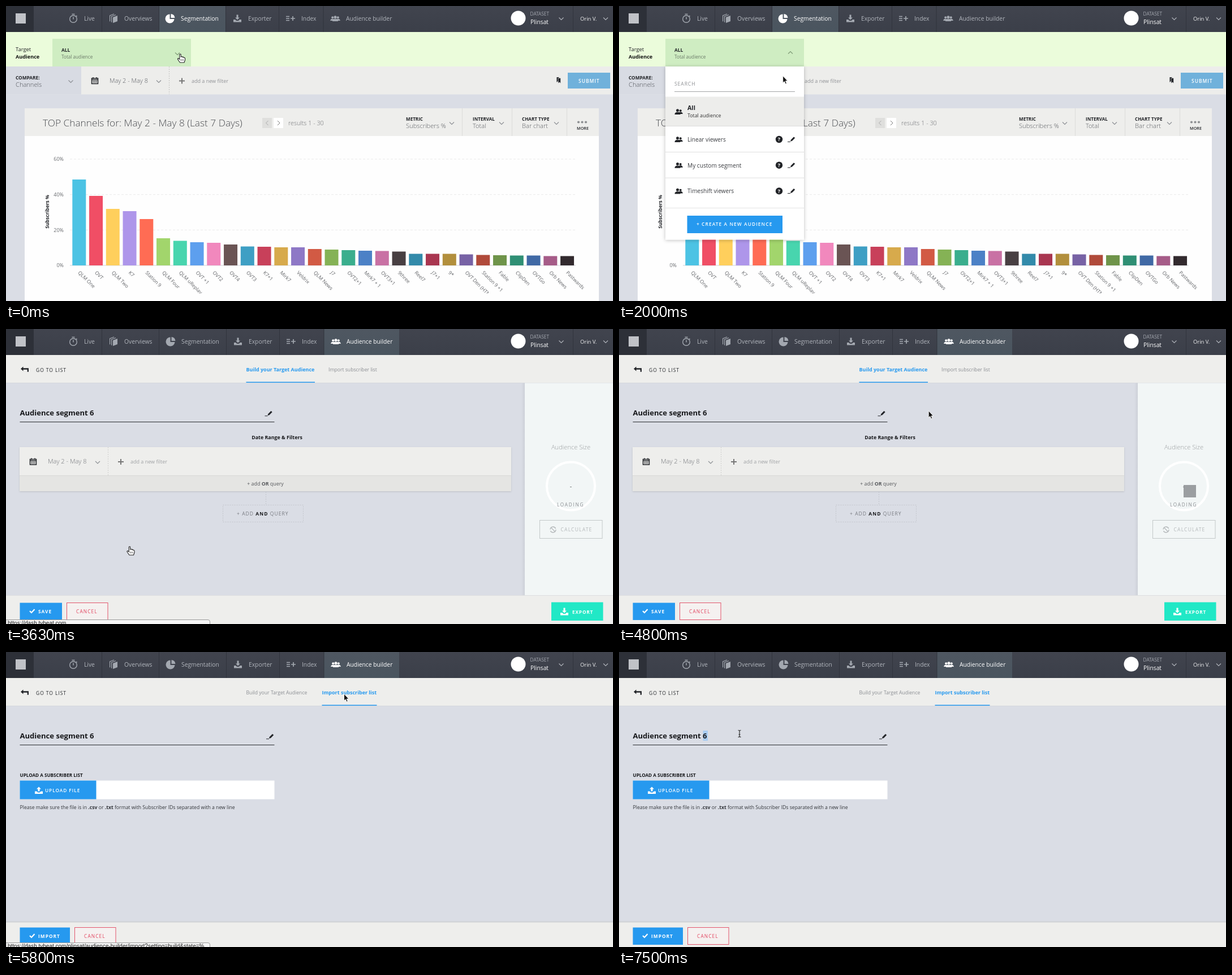
These frames come from a looping animation (1073 px wide and 522 px high, 8 s). An HTML page:

```html
<!DOCTYPE html>
<html lang="en">
<head>
<meta charset="utf-8">
<title>Audience builder</title>
<style>
html, body { margin: 0; width: 100%; height: 100%; overflow: hidden; background: #dadde5; }
svg { display: block; width: 100vw; height: 100vh; font-family: "Open Sans", sans-serif; }
</style>
</head>
<body>
<svg id="stage" viewBox="0 0 1073 522"></svg>
<script>
const LOOP = 8000;
const BLUE = '#2699ef', DARK = '#222428', GREY = '#8b8e93', PALE = '#eeeeec', BACK = '#dadde5';

// Drawing helpers
const rect = (x, y, w, h, fill, more = '') =>
  `<rect x="${x}" y="${y}" width="${w}" height="${h}" fill="${fill}" ${more}/>`;
const line = (x1, y1, x2, y2, stroke, more = '') =>
  `<path d="M${x1} ${y1}L${x2} ${y2}" stroke="${stroke}" fill="none" ${more}/>`;
const path = (d, fill, more = '') => `<path d="${d}" fill="${fill}" ${more}/>`;
const stroke = (d, color, width = 1, more = '') =>
  `<path d="${d}" fill="none" stroke="${color}" stroke-width="${width}" ${more}/>`;
const circle = (x, y, r, fill, more = '') => `<circle cx="${x}" cy="${y}" r="${r}" fill="${fill}" ${more}/>`;
const text = (x, y, str, size, fill, weight = 400, gap = 0, more = '') =>
  `<text x="${x}" y="${y}" font-size="${size}" fill="${fill}" font-weight="${weight}" letter-spacing="${gap}" ${more}>${str}</text>`;
const at = (x, y, body, scale = 1) => `<g transform="translate(${x} ${y}) scale(${scale})">${body}</g>`;
const group = (id, body) => `<g id="${id}">${body}</g>`;
const DASH = 'stroke-dasharray="2 2"';
const MIDDLE = 'text-anchor="middle"';

// Icons, centred on x, y
const chevron = (x, y, c, up) => at(x, y, stroke(up ? 'M-4 2L0-2L4 2' : 'M-4-2L0 2L4-2', c, 1.1));
const plus = (x, y) => at(x, y, stroke('M-5 0H5M0-5V5', '#777', 2));
const pencil = (x, y) => at(x, y,
  path('M-2 3.5L-1.2 .8L4-4.5L6.2-2.4L1 2.8Z', DARK) + stroke('M-7 4.3h5', DARK));
const calendar = (x, y) => at(x, y,
  stroke('M-5.5-4h11v9.5h-11zM-5.5-1.5h11M-3-6v3M3-6v3', DARK, 1.5) +
  stroke('M-3.5 1h7M-3.5 3.2h7', DARK, 1.3, 'stroke-dasharray="1.6 1.1"'));
const person = (x, scale, c) => at(x, 0,
  circle(0, -2.2, 2.5, c) + path('M-5 5c0-3 2-3.7 3.5-4.2h3c1.5.5 3.5 1.2 3.5 4.2z', c), scale);
const pair = (x, y) => at(x, y, person(3.2, .8, DARK) + person(-2, 1, DARK));
const trio = c => person(-4.8, .8, c) + person(4.8, .8, c) + person(0, 1, c);
const check = (x, y) => at(x, y, stroke('M-4 0l3 3l5.5-6', '#fff', 2.2));
const tray = (c, up) => path('M-7 2v4.5h14v-4.5h-3.5l-1.5 2h-4l-1.5-2z', c) +
  path(up ? 'M0-6l4 4h-2.5v4h-3v-4h-2.5z' : 'M0 2.5l4-4h-2.5v-5h-3v5h-2.5z', c);
const stopwatch = c => circle(0, 1, 6.3, 'none', `stroke="${c}" stroke-width="1.4"`) +
  stroke('M0 1.5v-4M-2.5-7.5h5M5-5l1.5 1.5', c, 1.5);
const layers = c => path('M-1-2L7-5V5L-1 8ZM-4-4L4-7V-5.8L-2.8-3.2V6.5L-4 7ZM-7-5.5L1-8.5V-7.3L-5.8-4.7V5L-7 5.5Z', c);
const pie = c => path('M-1-7.5A8 8 0 1 0 7 1H-1z', c) + path('M1-8A8 8 0 0 1 8-1H1z', c);
const list = c => stroke('M-8-3.5h6M-8 0h6M-8 3.5h6M0 0h8M4-4v8', c, 1.7);

// The items right of the active tab sit dx further along
function header(active, dx) {
  const items = [
    [119, 138, 'Live', stopwatch, 169, 0], [190, 209, 'Overviews', layers, 270, 0],
    [290.5, 309, 'Segmentation', pie, 388, 1], [409, 428, 'Exporter', tray, 482, 1],
    [503, 522, 'Index', list, 560.5, 1], [582, 601, 'Audience builder', trio, 0, 1]];
  const [left, width] = active === 2 ? [270, 118] : [562, 133];
  const edgeLine = x => line(x + .5, 0, x + .5, 46, '#31343d');
  let out = rect(0, 0, 1073, 46, 'url(#bar)') + rect(0, 0, 49, 46, '#2d3038') + rect(17, 13, 18, 18, '#c0c2c7') +
    rect(left, 0, width, 46, 'url(#tab)');
  items.forEach(([iconX, textX, label, icon, edge, moves], i) => {
    const d = moves * dx, on = i === active;
    out += at(iconX + d, 22, icon(on ? '#fff' : '#a3a8b0')) + text(textX + d, 25.5, label, 10.3, on ? '#fff' : '#b1b5bc');
    if (edge) out += edgeLine(edge + d);
  });
  return out + circle(905.5, 21.5, 13, '#fff') + text(926.5, 17, 'DATASET', 8.3, '#a5a9b1') +
    text(927, 32, 'Plinsat', 10.3, '#fff') + chevron(981.5, 22.5, '#b1b5bc') + edgeLine(1002) +
    text(1015, 25.5, 'Orin V.', 9.4, '#f3f3f4') + chevron(1060, 22.5, '#b1b5bc');
}

const COLORS = ('4cc3e4 f04e65 ffcf5c ae96ea ff6c54 a2d56c 48d5ae 5d9fee f188bd 6a5454 3e9fc4 c8405a d7aa4c 8e78c6 d25a44 ' +
  '85b255 3aae8d 4c81c6 c971a4 483f42 328aaa a93650 b28f3c 7762a5 b04a3a 6f944a 2f8f74 4069a5 a65c88 322a2e').split(' ');
const CHANNELS = ('QLM One,OVT,QLM Two,K7,Station 9,QLM Four,QLM uReplay,OVT +1,OVT2,OVT4,OVT3,K7+1,Mirk7,Veldrix,QLM News,' +
  'J7,OVT2+1,Mirk7 + 1,OVT3+1,9three,Reel7,J7+1,9*,OVT Den (HTML5),Station 9 +1,Fable,ClipDen,OVTGo,Orb News,Pastwards').split(',');
const HEIGHTS = [152, 123, 100, 96, 82, 48, 43.5, 41, 40, 37, 33.5, 33, 32, 32, 29, 28, 27, 26, 25.5, 24.5,
  20.5, 20.5, 20.5, 19.5, 18.5, 18, 17.5, 17.5, 16.5, 16.5];

function chart() {
  let out = rect(33, 181, 1015, 341, '#fefefe') + rect(33, 181, 1015, 49, PALE) +
    text(65, 213, 'TOP Channels for: May 2 - May 8 (Last 7 Days)', 17.3, '#4a4c50', 300) +
    rect(453, 198, 17, 18, '#dfdfdd') + rect(473, 198, 17, 18, '#fff') +
    stroke('M463.5 203l-4 4l4 4', '#aaa') + stroke('M480 203l4 4l-4 4', '#777') +
    text(499, 210.5, 'results 1 - 30', 10.8, '#6e7074', 300);
  [[707, 'METRIC', 'Subscribers %', 788], [825, 'INTERVAL', 'Total', 876], [912, 'CHART TYPE', 'Bar chart', 973]]
    .forEach(([x, name, value, cx]) => {
      out += text(x, 202.5, name, 8.1, DARK, 700) + text(x, 216, value, 11.15, '#5b5e63', 300) + chevron(cx, 207.5, GREY);
    });
  [806.5, 894.5, 991.5].forEach(x => out += line(x, 181, x, 230, '#dcdcda'));
  [1012, 1018.5, 1025].forEach(x => out += circle(x, 205.5, 2.1, '#8e9093'));
  out += text(1009, 218.5, 'MORE', 7.2, DARK, 600);
  for (let i = 0; i < 4; i++) {
    const y = 459 - i * 62.67;
    out += text(102, y + 3.3, i * 20 + '%', 9, '#6a6c70', 400, 0, 'text-anchor="end"');
    out += line(113, y, 1007, y, i ? '#eaeaea' : '#cfd2d8', i ? 'stroke-dasharray="4 3"' : '');
  }
  out += text(0, 0, 'Subscribers %', 8.6, DARK, 700, 0, MIDDLE + ' transform="translate(76 364) rotate(-90)"');
  let names = '';
  CHANNELS.forEach((name, i) => {
    const x = 117.3 + i * 29.75;
    out += rect(x, 459 - HEIGHTS[i], 24, HEIGHTS[i], '#' + COLORS[i]);
    names += text(0, 0, name, 8.7, '#606266', 400, 0, `transform="translate(${x + 9.5} 472.5) rotate(45)"`);
  });
  return out + `<g clip-path="url(#axis)">${names}</g>`;
}

function segmentation() {
  return rect(0, 0, 1073, 522, BACK) + chart() + rect(0, 46, 1073, 61, '#ebfcdb') + rect(82, 58, 245, 49, '#cfedc2') +
    text(17, 80, 'Target', 9.4, DARK) + text(17, 93, 'Audience', 9.1, '#111', 700) +
    text(98, 80.5, 'ALL', 8.3, DARK, 700) + text(98, 92.8, 'Total audience', 8.2, '#6b7a68') +
    group('closed', chevron(303, 84.5, '#7e9a76')) + group('opened', chevron(303, 82.5, '#7e9a76', true)) +
    rect(0, 107, 1073, 49.5, '#ededeb') + rect(0, 107, 133, 49.5, '#d8dbe3') +
    text(17, 129.5, 'COMPARE:', 8.3, DARK, 700) + text(17, 142.5, 'Channels', 11.1, '#4f5258', 300) + chevron(114.5, 133.5, GREY) +
    calendar(157, 132) + text(183, 136, 'May 2 - May 8', 10.95, '#585b61', 300) + chevron(270, 133.5, GREY) +
    line(288.5, 107, 288.5, 156, '#c4c4c2', DASH) + plus(311, 132.5) + text(328, 135.8, 'add a new filter', 9, '#909296') +
    path('M973.5 126h4v9l-2-2l-2 2z', DARK) + path('M976 127.5h4.5v9.5l-2.2-2.2l-2.3 2.2z', DARK, 'stroke="#eee" stroke-width=".6"') +
    rect(993, 118, 75, 28, '#70b1db') + text(1030.8, 135.8, 'SUBMIT', 8.5, '#fff', 600, .95, MIDDLE) +
    group('menu', menu()) + header(2, 0);
}

function menu() {
  let out = rect(82, 107, 245, 306.5, '#fff', 'filter="url(#shade)"') +
    text(98, 141, 'SEARCH', 8.6, '#8e9094', 400, .9) + line(98, 151.5, 311, 151.5, '#a2a4a7') +
    rect(82, 160.5, 245, 52, '#ededeb') + line(82, 212.5, 327, 212.5, '#dcdcdc') +
    pair(105.5, 187) + text(121, 184, 'All', 10.7, DARK, 700) + text(121, 197, 'Total audience', 8.8, '#333');
  ['Linear viewers', 'My custom segment', 'Timeshift viewers'].forEach((name, i) => {
    const y = 236 + i * 45.7;
    out += pair(105.5, y) + text(121, y + 3.8, name, 10.15, '#3a3c40') + circle(283, y, 6.2, DARK) +
      text(283, y + 3.3, '?', 9, '#fff', 700, 0, MIDDLE) + pencil(305, y);
    if (i < 2) out += line(82, y + 22.5, 327, y + 22.5, '#dedede');
  });
  return out + line(82, 357.5, 327, 357.5, '#e4e4e4') + rect(120.5, 371, 168.5, 31, BLUE, 'id="create"') +
    text(137, 389.3, '+ CREATE A NEW AUDIENCE', 8.4, '#fff', 600, 1.08);
}

function builderTop(active) {
  const tab = (x, label, on, width) => on
    ? text(x, 74.5, label, 9, BLUE, 700) + rect(x, 93.5, width, 1.5, BLUE)
    : text(x, 74.5, label, 8.65, GREY);
  const first = active === 0;
  return rect(0, 0, 1073, 522, BACK) + rect(0, 46, 1073, 49.5, PALE) + line(0, 95.5, 1073, 95.5, '#d6d8dd') +
    path('M26 70.5l4.5-4v2.8h9.5v6.5h-2.3v-4h-7.2v2.8z', DARK) + text(53, 76, 'GO TO LIST', 8.5, DARK, 400, .95) +
    tab(424.5, 'Build your Target Audience', first, 121.5) + tab(first ? 570 : 558.5, 'Import subscriber list', !first, 97) +
    (first ? '' : rect(148.5, 139, 8.5, 18, '#a9cdf3', 'id="picked"')) +
    text(24.5, 153, 'Audience segment 6', 13.05, '#17181b', 700) +
    line(24.5, 164.5, 474.5, 164.5, '#2b2d31') + pencil(first ? 464.5 : 467, 149.5);
}

function buttons(y, label, w) {
  return rect(24.5, y, w, 30.5, BLUE) + check(46, y + 14.5) + text(57, y + 18.3, label, 8.3, '#fff', 700, 1.05) +
    rect(w + 33, y, 72.5, 30, '#f5f1f0', 'stroke="#e2556c"') + text(w + 49.5, y + 18.3, 'CANCEL', 8.4, '#e2445f', 400, 1.1);
}

function build() {
  return builderTop(0) + text(479, 195, 'Date Range &amp; Filters', 8.9, '#17181b', 700, 0, MIDDLE) +
    rect(24, 209, 869, 78, PALE, 'filter="url(#soft)"') + rect(24, 259, 869, 28, '#e5e5e3') +
    line(24, 259.5, 893, 259.5, '#d8d8d6') +
    calendar(48, 234.5) + text(74, 238, 'May 2 - May 8', 11.05, '#707277', 300) + chevron(162, 236, GREY) +
    line(180.5, 209, 180.5, 259, '#cfcfcd', DASH) + plus(203, 235) + text(220, 238, 'add a new filter', 9, '#a0a2a5') +
    text(458.5, 276.5, '+ add <tspan font-weight="700">OR</tspan> query', 8.85, '#55575b', 400, 0, MIDDLE) +
    line(459.5, 288, 459.5, 311, '#c2c5cc', DASH) + rect(383.5, 311.5, 142, 30, 'none', 'stroke="#c2c5cc" ' + DASH) +
    text(408, 329.5, '+ ADD <tspan font-weight="700" fill="#17181b">AND</tspan> QUERY', 8.5, '#777a80', 400, 1.05) +
    rect(911, 95.5, 6, 376, 'url(#side)') + rect(917, 95.5, 156, 376, '#f2f6f6') +
    text(998.5, 213, 'Audience Size', 11.15, '#979b9d', 300, 0, MIDDLE) +
    circle(998.5, 278, 42.5, 'none', 'stroke="#fff" stroke-width="4"') +
    text(998.5, 283, '-', 12, '#77797c', 400, 0, MIDDLE) + group('loader', rect(0, 0, 1, 1, '#8b8e92')) +
    text(974, 314, 'LOADING', 8.2, '#8b8e92', 400, 1.75) +
    rect(943.5, 338.5, 110.5, 32, 'none', 'stroke="#c3c8c9"') +
    circle(967, 355, 5, 'none', 'stroke="#b4b8ba" stroke-width="1.4" stroke-dasharray="13 2.7"') +
    line(963, 351, 971, 359, '#b4b8ba', 'stroke-width="1.3"') + text(980.5, 358.3, 'CALCULATE', 8.5, '#b4b8ba', 400, 1.2) +
    rect(0, 471, 1073, 51, PALE) + line(0, 471.5, 1073, 471.5, '#dddee0') + buttons(484.5, 'SAVE', 74.5) +
    rect(964, 483.5, 91.5, 32.5, '#21e8c6') + at(987, 500, tray('#fff')) +
    text(1001, 503.5, 'EXPORT', 8.2, '#fff', 700, .9) + header(5, 1);
}

function upload() {
  const bold = s => `<tspan font-weight="700">${s}</tspan>`;
  return builderTop(1) + text(24.5, 220.5, 'UPLOAD A SUBSCRIBER LIST', 8.15, '#17181b', 700) +
    rect(24.5, 227.5, 450, 33, '#fff') + rect(24.5, 227.5, 135, 33, BLUE) + at(58, 244.5, tray('#fff', true)) +
    text(69, 248, 'UPLOAD FILE', 8.3, '#fff', 600, .95) +
    text(24.5, 278, `Please make sure the file is in ${bold('.csv')} or ${bold('.txt')} format with Subscriber IDs separated with a new line`, 8.66, '#33363b') +
    rect(0, 478, 1073, 44, PALE) + line(0, 477.5, 1073, 477.5, '#d0d2d6', 'stroke-width="2"') + buttons(487.5, 'IMPORT', 88.5) + header(5, 1);
}

const statusBar = path('M0 514.5h357q3.5 0 3.5 3.5v5H0z', '#f4f4f4', 'stroke="#9a9a9a"') +
  text(3, 524, '', 10, '#222', 400, 0, 'id="url" font-family="Liberation Sans, sans-serif"');

const HAND = 'M-1.2 1.2C-1.2-.5 1.2-.5 1.2 1.2V5.2C2 4 4 4.4 4 5.8C5 4.6 6.4 5.2 6.4 6.6C7.4 5.8 8.5 6.4 8.5 7.8' +
  'V10.5L7 15H-.5L-4.3 9.5C-5.2 7.8-3.3 7-2.3 8.3L-1.2 9.5Z';
const cursors =
  group('hand', path(HAND, '#fff', 'stroke="#222" stroke-width="1.1" stroke-linejoin="round"') +
    stroke('M1 9v3M3.2 9v3M5.4 9v3', '#444', .8)) +
  group('arrow', path('M0 0V12.3L2.7 9.8L4.7 14.2L6.7 13.3L4.8 9.1H8.5Z', '#111', 'stroke="#fff" stroke-width=".9"')) +
  group('beam', stroke('M-2.5-6q2.5 0 2.5 1.5q0-1.5 2.5-1.5M0-5V5M-2.5 6q2.5 0 2.5-1.5q0 1.5 2.5 1.5M-1.5 1.5h3', '#222', 1.1));

const stage = document.getElementById('stage');
const gradient = (id, dir, a, b) => `<linearGradient id="${id}" ${dir}>` +
  `<stop offset="0" stop-color="${a}"/><stop offset="1" stop-color="${b}"/></linearGradient>`;
const shadow = (id, blur, alpha) => `<filter id="${id}" x="-10%" y="-15%" width="120%" height="130%">` +
  `<feDropShadow dx="0" dy="1" stdDeviation="${blur}" flood-opacity="${alpha}"/></filter>`;
const DOWN = 'x2="0" y2="1"';
stage.innerHTML = '<defs>' + gradient('bar', DOWN, '#41444e', '#3b3f49') + gradient('tab', DOWN, '#4f5761', '#4a555f') +
  gradient('side', '', '#dadde5', '#cdd0d8') + shadow('shade', 3, .25) + shadow('soft', 1.5, .14) +
  '<clipPath id="axis"><path d="M100 460H1073V508.5H100Z"/></clipPath></defs>' +
  group('segmentation', segmentation()) + group('build', build()) + group('upload', upload()) +
  group('status', statusBar) + group('cursor', cursors);

const $ = id => document.getElementById(id);
const show = (id, on) => $(id).setAttribute('display', on ? 'inline' : 'none');
const clamp = v => Math.max(0, Math.min(1, v));
const ease = v => v * v * (3 - 2 * v);
const span = (t, a, b) => clamp((t - a) / (b - a));

// Pointer stops: time, x, y, and 1 where it passes without resting
const STOPS = [[0, 308, 85], [60, 307, 84.5], [1830, 307, 84.5], [2000, 290, 122.5, 1], [2200, 225, 361], [2460, 225, 361],
  [2600, 218.5, 385], [3900, 218.5, 385], [4700, 521, 174, 1], [4800, 547, 145, 1], [5100, 601, 60], [5330, 599, 74],
  [5700, 599, 74], [5900, 596, 74], [6600, 596, 74], [6730, 345, 149], [6900, 345, 149], [7300, 213, 144.5], [LOOP, 213, 144.5]];

function pointer(t) {
  const i = STOPS.findIndex(s => s[0] > t);
  const a = STOPS[i - 1], b = STOPS[i];
  const raw = span(t, a[0], b[0]);
  const k = a[3] || b[3] ? raw : ease(raw);
  return [1, 2].map(n => a[n] + (b[n] - a[n]) * k);
}

// The loading mark grows, holds, then shrinks away
function loaderSize(t) {
  const phase = (t - 3900) / 1100;
  if (phase < 0) return 0;
  const p = phase % 1;
  return 22 * (p < .5 ? (phase > 1 ? 1 - span(p, 0, .3) : 0) : span(p, .5, .75));
}

function draw(t) {
  const page = t < 3530 ? 0 : t < 5690 ? 1 : 2;
  ['segmentation', 'build', 'upload'].forEach((id, i) => show(id, i === page));

  const open = ease(span(t, 1200, 1480));
  show('closed', t < 1200);
  show('opened', t >= 1200);
  show('menu', open > 0);
  $('menu').setAttribute('opacity', open);
  $('menu').setAttribute('transform', `translate(0 ${-8 * (1 - open)})`);
  const hover = span(t, 2500, 2680);
  $('create').setAttribute('fill', `rgb(${38 - 38 * hover},${153 - 27 * hover},${239 - 29 * hover})`);

  const size = loaderSize(t);
  $('loader').setAttribute('transform', `translate(${1020 - size} ${298 - size}) scale(${size})`);
  $('loader').setAttribute('opacity', .4 + size / 50);

  const late = t > 5000;
  show('status', t >= 2580 && t < 4000 || t >= 5350 && t < 7050);
  $('status').setAttribute('opacity', late ? span(t, 5350, 5480) : span(t, 2580, 2700));
  $('url').textContent = 'https://dash.tvbeat.com' + (late ? '/plinsat/audience-builder/import?setting=build&state=%…' : '');
  show('picked', t >= 7500);

  const [x, y] = pointer(t);
  const hand = t < 1860 || t >= 2540 && t < 3950 || t >= 5150 && t < 5780;
  const beam = t >= 7050;
  show('hand', hand);
  show('beam', beam);
  show('arrow', !hand && !beam);
  $('cursor').setAttribute('transform', `translate(${x} ${y})`);
}

const start = performance.now();
function tick() {
  draw((performance.now() - start) % LOOP);
  requestAnimationFrame(tick);
}
tick();
</script>
</body>
</html>
```
